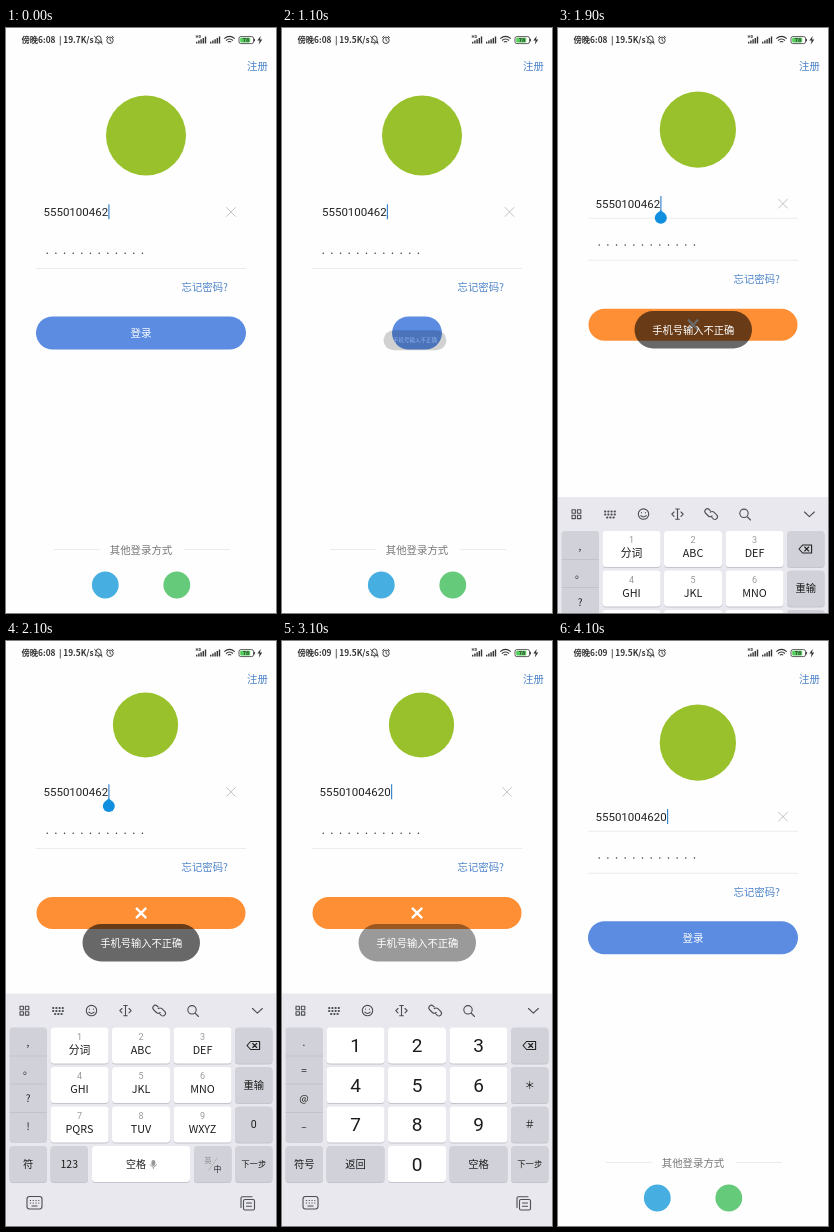
Recreate the animation shown at these times as an HTML page. Size 270x585 px, loop 4200 ms.

```html
<!DOCTYPE html>
<html lang="zh">
<head>
<meta charset="utf-8">
<title>登录</title>
<style>
  html, body { margin: 0; height: 100%; overflow: hidden; background: #fefefe; }
  svg { display: block; width: 100%; height: 100%; }
  text { font-family: "Noto Sans CJK SC", "Noto Sans CJK", sans-serif; }
  .num { font-family: Roboto, sans-serif; }
  .mid { text-anchor: middle; }
  .link { fill: #4a82c8; font-size: 10.4px; }
  .line { fill: none; stroke: #4c4d55; stroke-width: 1.1; stroke-linecap: round; stroke-linejoin: round; }
  .status { fill: #333; font-size: 8.3px; font-weight: 600; }
  .rule { stroke: #ececec; }
</style>
</head>
<body>
<svg viewBox="0 0 270 585">
  <rect width="270" height="585" fill="#fefefe"/>

  <g class="status">
    <text id="clock" x="15.5" y="15"></text>
    <text x="53" y="14.6">|</text>
    <text id="speed" x="57.3" y="15" textLength=""></text>
    <g fill="none" stroke="#333" stroke-width=".9">
      <path d="M89 14.3h7l-1-1.5v-2.3a2.5 2.5 0 0 0-5 0v2.3zM91.7 15.8h1.6M88.3 8.2l8.2 7.8"/>
      <circle cx="104" cy="12.3" r="3.2"/>
      <path d="M104 10.3v2.2l1.4.8M100.2 9.7l2-1.7M107.8 9.7l-2-1.7"/>
      <path d="M218.3 10.6q5.2-4.4 10.4 0M220 12.5q3.5-3 7 0M221.8 14.2q1.7-1.4 3.4 0" stroke-width="1.1"/>
    </g>
    <path id="bars"/>
    <text x="189.5" y="10.4" font-size="4">HD</text>
    <rect x="233" y="8.6" width="14.5" height="7" rx="1.8" fill="none" stroke="#333" stroke-width=".8"/>
    <rect x="234.2" y="9.8" width="10" height="4.6" rx=".8" fill="#53d05a"/>
    <path d="M248.4 10.8v2.6" stroke="#333"/>
    <text x="240" y="14.1" font-size="5.4" class="mid">78</text>
    <path d="M254.7 8l-3.4 4.6h2.3l-.8 3.8 3.5-4.8h-2.3z"/>
  </g>
  <text x="241" y="41.8" class="link">注册</text>

  <circle id="logo" fill="#98c12b"/>

  <g id="form">
    <g id="phone">
      <text id="number" class="num" x="37.5" y="188" font-size="11.5" fill="#222"></text>
      <rect id="caret" y="176.3" width="1.2" height="15" fill="#3a86cf"/>
      <path d="M220.3 179.2l9.4 9.4m0-9.4l-9.4 9.4" fill="none" stroke="#c3c3c3"/>
    </g>
    <path id="rule" class="rule" d="M30 198.5h210"/>
    <path d="M41.2 225.3h96" stroke="#333" stroke-width="1.5" stroke-linecap="round" stroke-dasharray="0 8.66"/>
    <path class="rule" d="M30 240.5h210"/>
    <text x="175.5" y="262.8" class="link">忘记密码?</text>
    <rect id="button"/>
    <text id="login" x="135" y="308.8" class="mid" font-size="10.5" font-weight="500" fill="#fff">登录</text>
    <path id="cross" d="M130 299.9l10.2 10.2m0-10.2l-10.2 10.2" stroke="#fff" stroke-width="2.3"/>
    <path id="handle" d="M102.8 190.6l4.1 3.1a6 6 0 1 1-8.2 0z" fill="#0f8fde"/>
  </g>

  <path class="rule" d="M48 521.5h46M178 521.5h46"/>
  <text x="135" y="525.8" class="mid" font-size="10.4" fill="#777">其他登录方式</text>
  <circle cx="99.3" cy="557" r="13.4" fill="#46aee0"/>
  <circle cx="170.8" cy="557" r="13.4" fill="#65ca79"/>

  <g id="board">
    <rect y="352.5" width="270" height="233" fill="#e8e8ee"/>
    <g class="line">
      <path d="M14 365.3h3.4v3.4H14zM19.4 365.3h3.4v3.4h-3.4zM14 370.7h3.4v3.4H14zM19.4 370.7h3.4v3.4h-3.4z"/>
      <path d="M47 367h11M47 370h11M49 373h7" stroke-width="1.9" stroke-dasharray=".4 2.8"/>
      <circle cx="85.5" cy="369.6" r="5.2"/>
      <path d="M83.5 368v.3M87.5 368v.3M82.8 371.2q2.7 2.6 5.4 0"/>
      <path d="M119.5 364.5v10.3M117.7 364.5h3.6M117.7 374.8h3.6M116 367.5l-2.2 2.2 2.2 2.2M123 367.5l2.2 2.2-2.2 2.2"/>
      <path d="M154 373.2l1.3 1.2a2.6 2.6 0 0 0 3.6-3.7l-3-3a2.6 2.6 0 0 0-3.7 0M152.2 366l-1.2-1.2a2.6 2.6 0 0 0-3.6 3.7l3 3a2.6 2.6 0 0 0 3.7 0"/>
      <path d="M189.5 372.5l3 3"/><circle cx="186" cy="368.8" r="4.2"/>
      <path d="M246.5 367.5l4.9 4.6 4.9-4.6"/>
      <rect x="21" y="555.5" width="15" height="12.5" rx="2.5"/>
      <path d="M24.3 559.5h8.6M24.3 562h8.6" stroke-dasharray=".3 2.5"/><path d="M26 565h5"/>
      <rect x="237.5" y="558.5" width="11" height="10.5" rx="1.5"/>
      <path d="M235 566.5v-9.2q0-1.5 1.5-1.5h9.5M240.5 562h5M240.5 565.3h5"/>
    </g>
    <g id="shared"></g>
    <g id="letters"></g>
    <g id="digits"></g>
  </g>

  <g id="toast">
    <rect x="76.5" y="283" width="117.5" height="37.5" rx="18.7" fill="#000" fill-opacity=".59"/>
    <text x="135.3" y="305.6" class="mid" font-size="10.25" fill="#fff">手机号输入不正确</text>
  </g>
</svg>
<script>
const $ = id => document.getElementById(id);
const set = (id, attrs) => { for (const k in attrs) $(id).setAttribute(k, attrs[k]); };
const show = (id, on) => set(id, { opacity: +on });

const LOOP = 4200, STEP = 100;
const GREY = '#d1d2d9', WHITE = '#fff', PRESSED = '#c9c9cc';
const rowY = [386.5, 426, 465.5, 505], colX = [44.5, 106, 167.5];

function label(x, y, s, size, fill = '#1b1b1b', cls = 'mid') {
  return `<text x="${x}" y="${y}" class="${cls}" font-size="${size}" fill="${fill}">${s}</text>`;
}
function key(x, row, w, fill, s = '', size = 10.3, id = '') {
  const y = rowY[row], box = (dy, f, i) =>
    `<rect ${i} x="${x}" y="${y + dy}" width="${w}" height="36" rx="3.5" fill="${f}"/>`;
  return box(.9, '#c4c5cc', '') + box(0, fill, id && `id="${id}"`) +
    label(x + w / 2, y + 18 + size * .36, s, size, '#1b1b1b', /^\d$/.test(s) ? 'mid num' : 'mid');
}
const sideLabels = list => [...list].map((s, i) => label(22, 405 + i * 28, s, 10)).join('');

function buildBoard() {
  $('shared').innerHTML =
    `<rect x="3.5" y="386.5" width="37.5" height="115.5" rx="3.5" fill="${GREY}"/>` +
    '<path d="M3.5 415h37.5M3.5 443h37.5M3.5 471.5h37.5" stroke="#bebfc7" stroke-width=".8"/>' +
    key(229, 0, 37.5, GREY) + key(229, 3, 37.5, GREY, '下一步', 8.3) +
    '<path d="M241 404.5l3.6-4h9v8h-9zM246.7 402.5l4 4m0-4l-4 4" class="line" style="stroke:#222"/>';

  const names = ['分词', 'ABC', 'DEF', 'GHI', 'JKL', 'MNO', 'PQRS', 'TUV', 'WXYZ'];
  let letters = sideLabels(',。?!'), digits = sideLabels('.=@–');
  names.forEach((s, i) => {
    const x = colX[i % 3], row = Math.floor(i / 3), y = rowY[row];
    letters += key(x, row, 58, WHITE) +
      label(x + 29, y + 12.4, i + 1, 9, '#999', 'mid num') + label(x + 29, y + 26, s, 10.8);
    digits += key(x, row, 58, WHITE, String(i + 1), 19);
  });
  $('letters').innerHTML = letters +
    key(229, 1, 37.5, GREY, '重输') + key(229, 2, 37.5, GREY, '0', 10.5) +
    key(3.5, 3, 37.5, GREY, '符') + key(44.5, 3, 37.5, GREY, '123', 10.5, 'toDigits') +
    key(86, 3, 98, WHITE) + label(130, 527.3, '空格', 10) +
    '<rect x="145.4" y="519" width="4" height="6" rx="2" fill="#999"/>' +
    '<path d="M144 523.3q3.4 5.6 6.8 0M147.4 526v2" fill="none" stroke="#999" stroke-width=".9"/>' +
    key(188, 3, 37.5, GREY) + label(202, 522, '英', 7, '#888') + label(211.5, 531, '中', 7.5) +
    '<path d="M202.5 529.5l9-13" stroke="#aaa" stroke-width=".7"/>';
  $('digits').innerHTML = digits +
    key(229, 1, 37.5, GREY, '＊', 10.5) + key(229, 2, 37.5, GREY, '＃', 10.5) +
    key(3.5, 3, 37.5, GREY, '符号') + key(44.5, 3, 58, GREY, '返回') +
    key(106, 3, 58, WHITE, '0', 19, 'zero') + key(167.5, 3, 58, GREY, '空格');
}

function buildBars() {
  let d = '';
  for (const x of [190, 204])
    for (let i = 0; i < 5; i++) d += `M${x + i * 2.2} 15.6h1.4v${-1.8 - i * 1.3}h-1.4z`;
  set('bars', { d });
}

const ramp = (t, a, b) => Math.min(1, Math.max(0, (t - a) / (b - a)));
const ease = (t, a, b) => (1 - Math.cos(Math.PI * ramp(t, a, b))) / 2;
const within = (t, a, b) => t >= a && t < b;

function drawButton(t) {
  const failed = within(t, 1200, 3800);
  const shrink = t < 3800 ? ease(t, 800, 1175) - ease(t, 1200, 1560) : 0;
  const w = (failed ? 209 : 210) - 177 * shrink, h = failed ? 32 : 33;
  set('button', {
    x: 135 - w / 2, y: 305 - h / 2, width: w, height: h, rx: h / 2,
    fill: failed ? '#ff8f35' : '#5b8ce2'
  });
  show('login', !within(t, 800, 3800));
  set('cross', { opacity: failed ? ramp(t, 1300, 1600) : 0 });
}

function drawPhone(t) {
  const u = ramp(t, 800, 1200);
  const shake = 10 * (1 - u) * Math.sin(6 * Math.PI * u);
  const typed = t >= 2700 || t < 0;
  const first = '5550100462';
  $('number').textContent = typed ? first + '0' : first;
  set('phone', { transform: `translate(${shake} 0)` });
  set('caret', { x: typed ? 109 : 102.3 });
  const hidden = within(t, 600, 1100) || within(t, 1600, 1800) || within(t, 3200, 3700);
  show('caret', !hidden);
  show('handle', within(t, 1800, 2700));
}

function drawToast(t) {
  const k = 1 - (1 - ramp(t, 1100, 1300)) ** 2;
  const s = .535 + .465 * k;
  const dx = -2.3 * (1 - k), dy = 10.5 * (1 - k);
  set('toast', {
    opacity: t < 1100 ? 0 : (.3 + .7 * k) * (1 - ramp(t, 3000, 3300)),
    transform: `translate(${135.3 + dx} ${301.7 + dy}) scale(${s}) translate(-135.3 -301.7)`
  });
}

function draw(t) {
  const lift = ease(t, 1800, 2100) - ease(t, 3900, 4200);
  set('form', { transform: `translate(0 ${-33 * lift})` });
  set('logo', { cx: 140 - .5 * lift, cy: 107.5 - 23.5 * lift, r: 40 - 7.4 * lift });
  show('rule', lift > 0 && lift < 1);

  const up = ease(t, 1750, 2050) - ease(t, 3760, 4060);
  set('board', { transform: `translate(0 ${233 * (1 - up)})` });
  show('letters', t < 2400);
  show('digits', t >= 2400);
  set('toDigits', { fill: within(t, 2300, 2400) ? '#b5b6bf' : GREY });
  set('zero', { fill: within(t, 2600, 2700) ? PRESSED : WHITE });

  $('clock').textContent = t < 3100 ? '傍晚6:08' : '傍晚6:09';
  $('speed').textContent = t < 700 ? '19.7K/s' : '19.5K/s';
  drawButton(t);
  drawPhone(t);
  drawToast(t);
}

const start = performance.now();
function tick() {
  const t = Math.max(0, performance.now() - start) % LOOP;
  draw(Math.floor(t / STEP) * STEP);
  requestAnimationFrame(tick);
}

$('speed').removeAttribute('textLength');
buildBars();
buildBoard();
tick();
</script>
</body>
</html>
```
